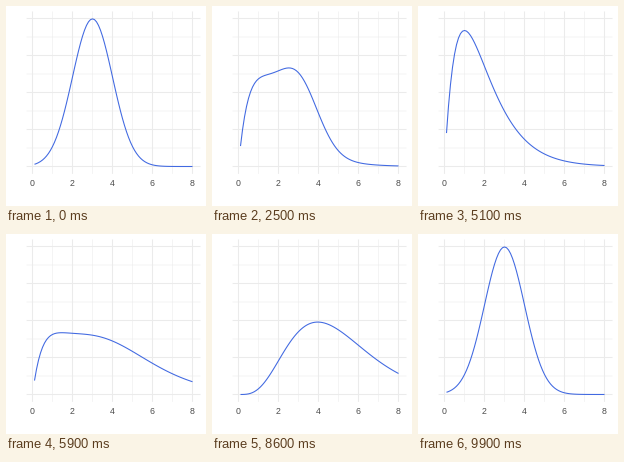
A matplotlib script that plays this animation: 200 px wide and 200 px high, repeating every 10000 ms.

```python
import math

import matplotlib.pyplot as plt
import numpy as np
from matplotlib.animation import FuncAnimation

SIZE, DPI = 200, 100
PX = 72 / DPI  # points per pixel
FRAMES, INTERVAL = 100, 100
X0, Y0, SX, SY = 26.5, 160.5, 20, 370
LEFT, RIGHT, TOP, BOTTOM = 20.6, 194.5, 5.5, 167.9
HOLD = 17
MOVES = [(17, 17), (51, 17), (85, 16)]  # start and length of each transition


def gamma_pdf(x, k):
    return x ** (k - 1) * np.exp(-x) / math.gamma(k)


x = np.linspace(0.1, 8, 80)
normal = np.exp(-((x - 3) ** 2) / 2) / math.sqrt(2 * math.pi)
states = [normal, gamma_pdf(x, 2), gamma_pdf(x, 5)]


def ease(t):
    return 4 * t**3 if t < 0.5 else 1 - 4 * (1 - t) ** 3


def density(frame):
    y = states[0]
    for i, (start, length) in enumerate(MOVES):
        if frame >= start:
            s = ease(min((frame - start + 1) / length, 1))
            y = states[i] * (1 - s) + states[(i + 1) % 3] * s
    return y


fig = plt.figure(figsize=(SIZE / DPI, SIZE / DPI), dpi=DPI, facecolor="white")
ax = fig.add_axes([0, 0, 1, 1])
ax.set(xlim=(0, SIZE), ylim=(SIZE, 0))
ax.axis("off")


def grid_line(xs, ys, width):
    ax.plot(xs, ys, color="#EBEBEB", lw=width * PX, snap=False,
            solid_capstyle="butt")


for offset, step_width in ((1, 0.53), (0, 1.07)):
    for v in range(offset, 9, 2):
        gx = X0 + v * SX
        grid_line([gx, gx], [TOP, BOTTOM], step_width)
        gy = Y0 - v * 0.05 * SY
        if gy > TOP:
            grid_line([LEFT, RIGHT], [gy, gy], step_width)

for v in range(0, 9, 2):
    ax.text(X0 + v * SX, 180, str(v), ha="center", va="baseline",
            family="Liberation Sans", fontsize=8.8 * PX, color="#4D4D4D")

curve, = ax.plot([], [], color="#4169E1", lw=1.07 * PX, snap=False,
                 solid_capstyle="butt", solid_joinstyle="round")


def update(frame):
    curve.set_data(X0 + x * SX, Y0 - density(frame) * SY)
    return (curve,)


anim = FuncAnimation(fig, update, frames=FRAMES, interval=INTERVAL,
                     repeat=True, repeat_delay=0)
plt.show()
```
